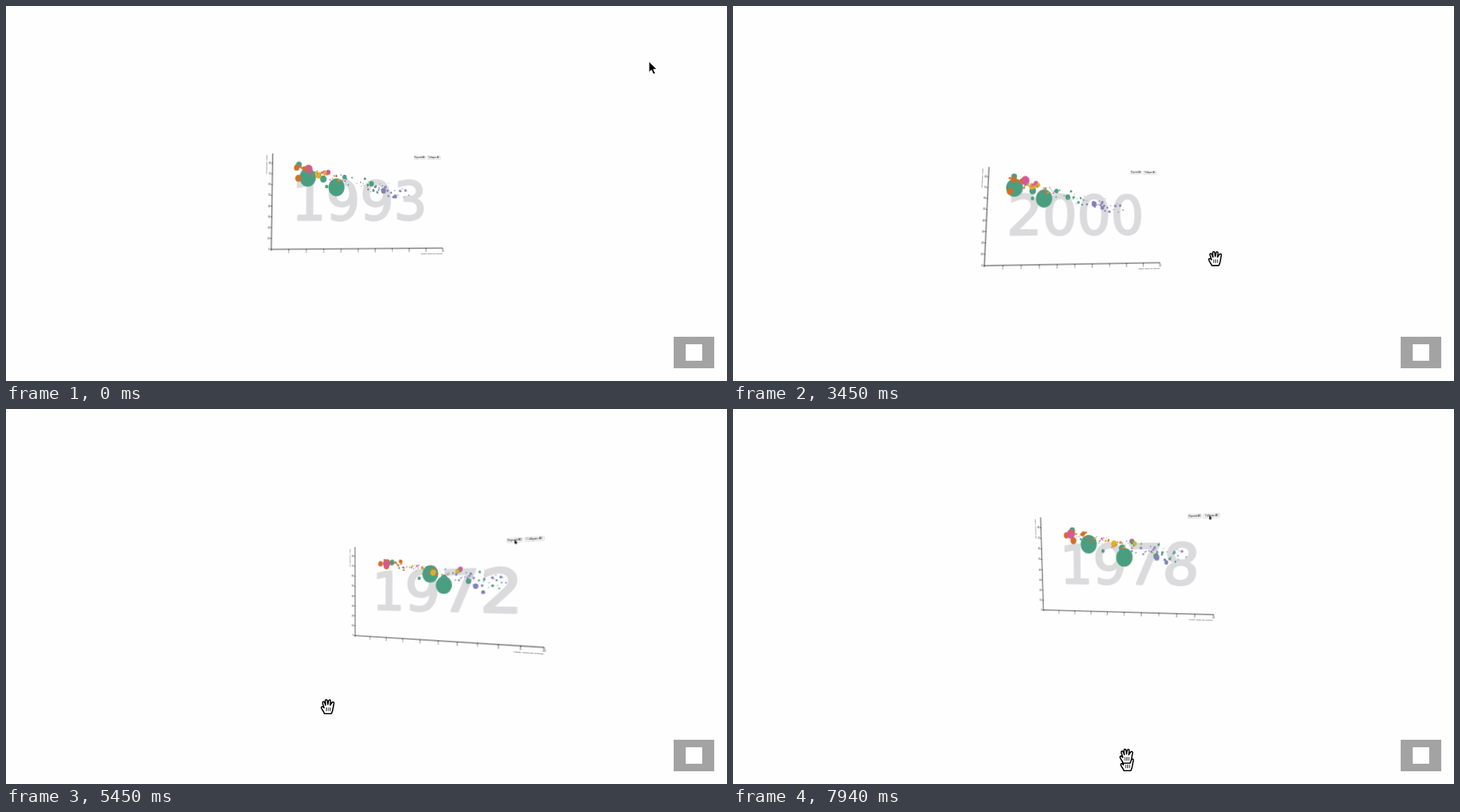
These frames come from a looping animation (960 px wide and 500 px high, 8000 ms). An HTML page:

```html
<!DOCTYPE html>
<html lang="en">
<head>
<meta charset="utf-8">
<title>Bubble chart</title>
<style>
  html, body { margin: 0; width: 100%; height: 100%; overflow: hidden; background: #fefefe; }
  #stage { position: absolute; left: 0; top: 0; width: 960px; height: 500px; overflow: hidden;
    perspective: 300px; perspective-origin: 480px 250px; }
  svg { position: absolute; overflow: visible; }
  #chart { left: 347px; top: 176px; width: 260px; height: 150px; transform-origin: 133px 74px;
    font-family: "Liberation Sans", Arial, sans-serif; }
  #year { font: 70.7px "DejaVu Sans", sans-serif; fill: #dbdadc; stroke: #dbdadc;
    stroke-width: 2.4; stroke-linejoin: round; }
  .axis { fill: none; stroke: #111; stroke-width: .8; }
  .tick { font-size: 2.8px; fill: #222; }
  .label { font-size: 2.5px; fill: #000; }
  .button rect { fill: #fff; stroke: #999; stroke-width: .3; }
  .button text { font-size: 2.9px; text-anchor: middle; }
  #overlay { left: 0; top: 0; width: 960px; height: 500px; }
  .cursor { stroke: #000; stroke-linejoin: round; stroke-linecap: round; }
</style>
</head>
<body>
<div id="stage">
  <svg id="chart" viewBox="-20 -10 260 150">
    <text id="year" x="115.5" y="88" text-anchor="middle"></text>
    <g id="axes"></g>
    <g id="bubbles"></g>
    <text class="label" x="226" y="134" text-anchor="end">Fertility (births per woman)</text>
    <text class="label" transform="translate(-7.5 2) rotate(-90)" text-anchor="end">Life expectancy (years)</text>
    <g class="button"><rect x="188.5" y="2" width="15" height="4.4"/><text x="196" y="5.2">Expand All</text></g>
    <g class="button"><rect x="206" y="2" width="18.5" height="4.4"/><text x="215.2" y="5.2">Collapse All</text></g>
    <path id="pointer" d="M0 0V4.4L1 3.5 1.8 5 2.5 4.7 1.9 3.2H3.1Z"/>
  </svg>
  <svg id="overlay" viewBox="0 0 960 500">
    <defs>
      <g id="hand" class="cursor">
        <path fill="#fff" stroke-width="1.6" d="M-4.5 9.3C-5.5 6-8.7 3.5-8.7 1.2-8.7-.8-6.6-.5-5 1.5L-7-4.5C-7.5-7-5.4-7.6-4.5-5.7L-3-2-3.5-7.6C-3.5-9.9-1-9.9-.7-7.8L0-3 1-7.8C1.4-9.9 4-9.4 3.6-7.2L3-2 5.4-5.5C7-7.2 8.7-6 8-3.8 6.8 0 7.5 4 4.7 9.3Z"/>
        <path fill="none" stroke-width=".9" d="M-2 1.5V5.5M.5 1.5V5.5M3 1.5V5.5"/>
      </g>
    </defs>
    <rect x="889" y="441" width="54" height="42" fill="#a3a3a3"/>
    <rect x="905" y="451" width="22" height="22" fill="#fff"/>
    <path id="arrow" class="cursor" fill="#000" style="stroke:#fff" d="M0 0V14.5L3.3 11.4 6 17 8.7 15.8 6.2 10.4H10.5Z"/>
    <use id="echo" href="#hand"/>
    <use id="grip" href="#hand"/>
  </svg>
</div>
<script>
const $ = id => document.getElementById(id);
const lerp = (a, b, k) => a + (b - a) * k;
const clamp = k => Math.min(1, Math.max(0, k));
const smooth = k => k * k * (3 - 2 * k);

function add(parent, tag, attrs, text) {
  const node = document.createElementNS('http://www.w3.org/2000/svg', tag);
  for (const key in attrs) node.setAttribute(key, attrs[key]);
  if (text !== undefined) node.textContent = text;
  return parent.appendChild(node);
}

// Rows start with their position on the timeline; the remaining columns are interpolated.
function sample(rows, at) {
  let i = 0;
  while (i < rows.length - 2 && at >= rows[i + 1][0]) i++;
  const [a, b] = [rows[i], rows[i + 1]];
  const k = clamp((at - a[0]) / (b[0] - a[0]));
  return a.slice(1).map((v, n) => lerp(v, b[n + 1], k));
}

// time, cursor x, cursor y, yaw, pitch
const poses = [
  [0, 856, 74, -2.1, 2.1], [880, 856, 74, -2.1, 2.1], [1680, 614, 366, -2.1, 2.1],
  [1900, 615, 370, -2.1, 2.1], [2560, 615, 370, -2.1, 2.1], [3330, 632, 348, -3.7, 4.6],
  [3450, 642, 337, -4.6, 5.7], [3800, 688, 280, -9.7, 11.5], [4140, 678, 275, -8.7, 12],
  [4550, 520, 290, 8, 10.5], [4800, 395, 345, 21.2, 4.2], [4970, 376, 338, 23.3, 5.1],
  [5200, 370, 330, 24, 6], [5500, 440, 410, 16.5, -2.5], [5800, 508, 468, 9.8, -8.6],
  [5970, 512, 473, 9.4, -9.1], [6150, 512, 473, 9.4, -9.1], [6650, 512, 290, 9.4, 12],
  [6820, 512, 276, 9.6, 13.5], [7000, 512, 274, 9.6, 13.7], [7450, 515, 365, 9.3, 3.5],
  [7800, 524, 458, 8, -7], [7940, 524, 463, 7.9, -7.8]
];

const colors = { g: '#4a9e80', o: '#cf7029', p: '#8280b9', m: '#d8559a', y: '#dfae2a' };

// Collapsed regions: x, y, radius
const regions = {
  g: [122.7, 47, 17.6], p: [153, 55, 7.6], o: [51.5, 27, 9.4], m: [76.5, 30, 6.3], y: [111, 38.5, 5]
};

// Large bubbles: radius, then x and y at each knot year
const knots = [1974, 1978, 1993, 2000];
const large = [
  ['g', 11, 101, 40, 65, 36, 46.5, 32, 33.6, 27],
  ['g', 10.8, 119, 56, 112, 53.5, 84.5, 45, 72, 41],
  ['o', 4.2, 45, 29, 44.5, 31, 34, 33, 28, 32],
  ['g', 3.8, 47, 22, 43, 18, 34.5, 15, 32.5, 12.5],
  ['o', 3.6, 36, 25, 35, 24, 31.5, 19, 32, 16],
  ['o', 2.6, 66, 23, 58, 22, 41, 20, 42, 18],
  ['m', 5.6, 43, 24.5, 41, 22.5, 47, 21, 47, 17.5],
  ['g', 4.4, 119, 46, 109, 41.5, 67, 34, 57, 31],
  ['y', 4, 106, 39, 98.5, 36, 60.5, 29, 56, 25],
  ['m', 3, 144, 36, 121, 33, 73.5, 25, 61, 21],
  ['g', 3.3, 150, 51, 152, 52, 131.5, 40, 103, 39],
  ['p', 3.3, 156, 57, 153, 54, 147, 49.5, 138, 48],
  ['p', 2.4, 165, 65, 165, 60, 163, 57, 149, 53],
  ['g', 2.8, 137, 37, 122, 34, 95, 31, 88, 31],
  ['y', 2.6, 137, 38, 125, 36, 68.5, 25, 64, 23],
  ['g', 2.2, 86, 46, 84, 45, 71.5, 44, 57, 41]
];

let seed = 11;
const random = () => (seed = seed * 16807 % 2147483647) / 2147483647;

function smallBubble(_, i) {
  const u = (i + random()) / 95, x = 42 + 150 * u;
  const pick = random();
  const key = u < .2 ? (pick < .75 ? 'o' : 'g')
    : u < .6 ? 'gymop'[Math.floor(pick * 5)]
    : pick < .62 ? 'p' : pick < .9 ? 'g' : 'y';
  const y = 23 + 30 * u + (random() + random() - 1) * lerp(5, 15, u);
  const r = .5 + 1.3 * random() ** 2;
  const late = key === 'p' ? lerp(75, 178, u) : 27 + (x - 42) * .66;
  const lateY = 17 + (late - 27) * .26 + (y - 23 - 30 * u) * .8;
  return { key, r, track: [[1974, x, y], [2000, late, lateY]] };
}

const bubbles = [
  ...large.map(([key, r, ...xy]) => ({
    key, r, track: knots.map((year, n) => [year, xy[2 * n], xy[2 * n + 1]])
  })),
  ...Array.from({ length: 95 }, smallBubble)
];
for (const b of bubbles) b.node = add($('bubbles'), 'ellipse', { fill: colors[b.key] });
const groups = Object.keys(regions).map(key => ({
  key, node: add($('bubbles'), 'ellipse', { fill: colors[key] })
}));

const axes = $('axes');
add(axes, 'path', { class: 'axis', d: 'M0 0V126H226' });
for (let i = 0; i <= 10; i++) {
  const x = 22.6 * i;
  add(axes, 'path', { class: 'axis', d: `M${x} 126v1.6` });
  if (i) add(axes, 'text', { class: 'tick', x, y: 130.6, 'text-anchor': 'middle' }, i);
}
for (let i = 0; i <= 8; i++) {
  const y = 126 - 14.1 * i;
  add(axes, 'path', { class: 'axis', d: `M0 ${y}h-1.4` });
  add(axes, 'text', { class: 'tick', x: -2, y: y + 1, 'text-anchor': 'end' }, i * 10);
}

function place(node, x, y, r) {
  node.setAttribute('cx', x);
  node.setAttribute('cy', y);
  node.setAttribute('rx', r * .98);
  node.setAttribute('ry', r * 1.1);
}

const move = (id, x, y) => $(id).setAttribute('transform', `translate(${x} ${y})`);
const show = (id, on) => $(id).setAttribute('visibility', on ? 'visible' : 'hidden');
const restart = 4200;

function draw(t) {
  const [x, y, yaw, pitch] = sample(poses, t);
  $('chart').style.transform =
    `translateZ(300px) rotateX(${pitch}deg) rotateY(${-yaw}deg) translateZ(-300px)`;

  const year = t < restart ? Math.min(2000, 1993.2 + t * .0021) : 1970 + (t - restart) * .00215;
  $('year').textContent = Math.floor(year);

  const open = t < restart ? 1 : smooth(clamp((t - 5080) / 450));
  for (const b of bubbles) {
    const [bx, by] = sample(b.track, year);
    const [gx, gy] = regions[b.key];
    place(b.node, lerp(gx, bx, open), lerp(gy, by, open), b.r * open);
  }
  for (const { key, node } of groups) {
    const [gx, gy, r] = regions[key];
    place(node, gx, gy, r * (1 - open));
  }

  show('pointer', t >= restart);
  move('pointer', lerp(196, 213, smooth(clamp((t - 6300) / 350))), 4);

  const dragging = t >= 1680;
  show('arrow', !dragging);
  show('grip', dragging);
  show('echo', t >= 7900);
  move('arrow', x, y);
  move('grip', x, y);
  move('echo', x + 1, y + 10);
}

const start = performance.now();
function frame() {
  draw((performance.now() - start) % 8000);
  requestAnimationFrame(frame);
}
frame();
</script>
</body>
</html>
```
